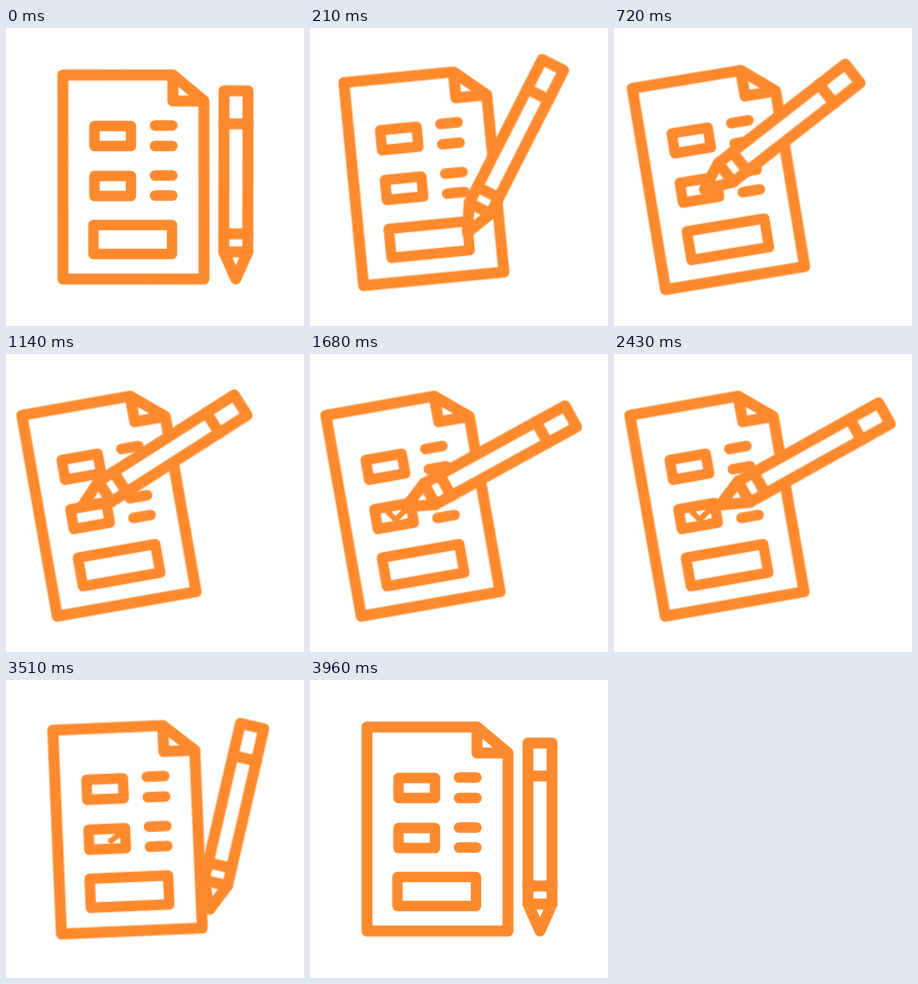
An HTML page without scripts for the animation above (4230 ms loop, 298x298 px).

```html
<!DOCTYPE html>
<html lang="en">
<head>
<meta charset="utf-8">
<title>Form and pencil</title>
<style>
html, body { margin: 0; width: 100%; height: 100%; overflow: hidden; background: #fff; }
svg { display: block; width: 100vw; height: 100vh; }
.ink { fill: none; stroke: #ff8a2d; stroke-width: 11; stroke-linecap: round; stroke-linejoin: round; }
.fields { stroke-width: 10.4; }
.page, .pencil, .tick { animation: 4230ms linear infinite; }

.page { transform-origin: 127.5px 149px; animation-name: tilt; }
.pencil { fill: #fff; animation-name: write; }
.tick { stroke-width: 5.5; stroke-dasharray: 1 2; animation-name: mark; }

@keyframes tilt {
  0% { transform: translate(0px, 0px) rotate(0deg); animation-timing-function: cubic-bezier(.1, .25, .12, .95); }
  25.5% { transform: translate(-24.5px, .5px) rotate(-10deg); }
  64.3% { transform: translate(-24.5px, .5px) rotate(-10deg); animation-timing-function: cubic-bezier(.45, 0, .52, 1); }
  93.6%, 100% { transform: translate(0px, 0px) rotate(0deg); }
}

/* Each stop places the pencil tip, then leans the body around it. */
@keyframes write {
  0% { transform: translate(230px, 251px) rotate(0deg); animation-timing-function: cubic-bezier(.12, .2, .15, .89); }
  26.24% { transform: translate(76px, 152px) rotate(57.4deg); animation-timing-function: ease-in-out; }
  34.04% { transform: translate(86px, 165px) rotate(59.5deg); }
  39.72% { transform: translate(96px, 153px) rotate(61.2deg); animation-timing-function: ease-out; }
  51.06% { transform: translate(105px, 151px) rotate(61.2deg); animation-timing-function: ease-in; }
  63.83% { transform: translate(109px, 151px) rotate(60deg); animation-timing-function: cubic-bezier(.6, .05, .44, 1); }
  93.62%, 100% { transform: translate(230px, 251px) rotate(0deg); }
}

@keyframes mark {
  0%, 26.24% { stroke-dashoffset: 1.1; animation-timing-function: ease-in-out; }
  34.04% { stroke-dashoffset: .57; }
  39.72% { stroke-dashoffset: .26; animation-timing-function: ease-out; }
  51.06%, 78% { stroke-dashoffset: 0; }
  88.7%, 100% { stroke-dashoffset: -1.1; }
}
</style>
</head>
<body>
<svg viewBox="0 0 298 298">
  <g class="ink page">
    <path d="M57 47H167L198 73V251H57ZM167 47V73H198"/>
    <g class="fields">
      <path d="M88.5 98H125V118H88.5ZM88.5 148H125V168H88.5ZM87.5 197H166V226H87.5Z"/>
      <path d="M149 97.5H166.500M149 118H166.500M149 147.500H166.500M149 167.500H166.500"/>
    </g>
    <path class="tick" pathLength="1" d="M98 148L107.500 162L126 149"/>
  </g>
  <g class="ink pencil">
    <path d="M-12 -188H12V-27L0 0L-12 -27Z"/>
    <path d="M-12 -155H12M-12 -45H12M-12 -27H12"/>
  </g>
</svg>
</body>
</html>
```
